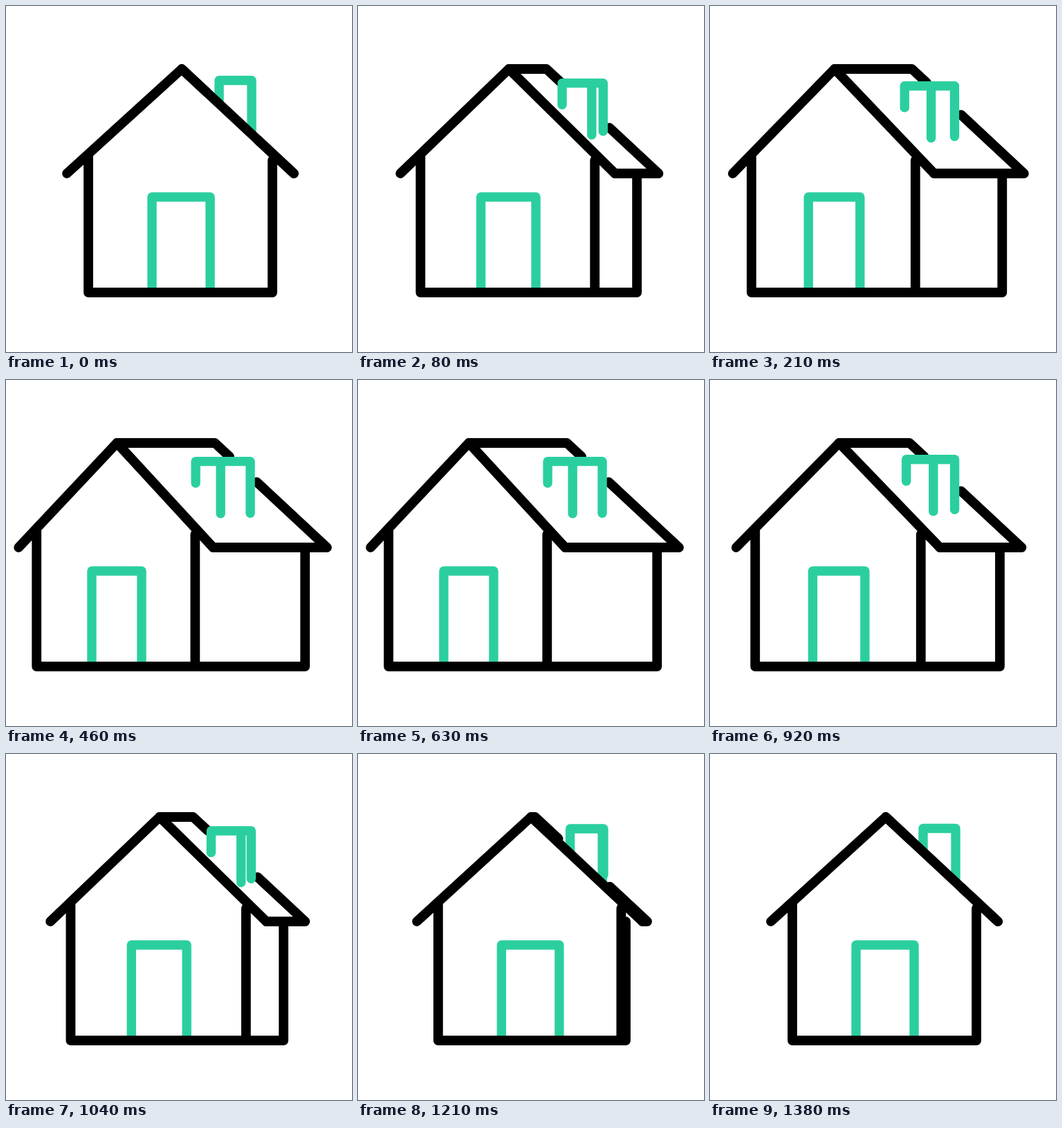
Write an HTML page that moves like this. It is 500 px wide and 500 px high and loops after 1430 ms.

```html
<!DOCTYPE html>
<html lang="en">
<head>
<meta charset="utf-8">
<title>House</title>
<style>
  html, body { margin: 0; width: 100%; height: 100%; overflow: hidden; background: #fff; }
  svg { display: block; width: 100vw; height: 100vh; }
  path { fill: none; stroke: #000; stroke-width: 13.8; stroke-linecap: round; stroke-linejoin: round; }
  .accent { stroke: #2bcf9f; stroke-width: 13.4; }
</style>
</head>
<body>
<svg viewBox="0 0 500 500">
  <path id="back"/>
  <path id="chimney" class="accent"/>
  <path id="door" class="accent"/>
  <path id="front"/>
</svg>
<script>
const LOOP = 1430, FPS = 24, LAST = 33;
const TOP = 91, EAVE = 242, BASE = 414;
const $ = id => document.getElementById(id);
const parts = { back: $('back'), chimney: $('chimney'), door: $('door'), front: $('front') };

function bezier(x1, y1, x2, y2) {
  const at = (p, q, s) => 3 * (1 - s) * (1 - s) * s * p + 3 * (1 - s) * s * s * q + s * s * s;
  return x => {
    if (x <= 0) return 0;
    if (x >= 1) return 1;
    let lo = 0, hi = 1;
    for (let i = 0; i < 30; i++) {
      const mid = (lo + hi) / 2;
      if (at(x1, x2, mid) < x) lo = mid; else hi = mid;
    }
    return at(y1, y2, lo);
  };
}

const turnOut = bezier(0.167, 0.167, 0.165, 1);
const turnBack = bezier(0.65, 0, 0.47, 1);

// 0 = seen from the front, 1 = fully turned
const turnAt = step => step < 14 ? turnOut(step / 12) : 1 - turnBack((step - 14) / 18);

const line = (...pts) => 'M' + pts.map(p => p.map(v => v.toFixed(2)).join(' ')).join('L');

function draw(a) {
  const mix = (from, to) => from + (to - from) * a;

  const apex = mix(254, 160), ridge = mix(254, 302);
  const eaveL = mix(88, 18), eaveM = mix(416, 299), eaveR = mix(416, 464);
  const wallL = mix(119, 44), wallM = mix(385, 273), wallR = mix(385, 432.3);
  const doorL = mix(211, 123.7), doorR = mix(295, 195.7);
  const chimL = mix(308, 274), chimM = mix(355, 310), chimR = mix(355, 353);
  const chimTop = mix(107.5, 117.7);

  // the rear slope is interrupted by the chimney
  const slope = k => [ridge + (eaveR - ridge) * k, TOP + (EAVE - TOP) * k];
  const cut = 0.13 + 0.09 * Math.max(0, 1 - a / 0.3);
  const resume = mix(0.68, 0.373);

  parts.back.setAttribute('d',
    line([apex, TOP], [ridge, TOP], slope(cut)) +
    line(slope(resume), [eaveR, EAVE], [eaveM, EAVE]));

  parts.chimney.setAttribute('d',
    line([chimL, mix(139, 149)], [chimL, chimTop], [chimR, chimTop], [chimR, mix(174, 192.5)]) +
    line([chimM, chimTop], [chimM, mix(182, 193)]));

  parts.door.setAttribute('d',
    line([doorL, BASE - 2], [doorL, 276], [doorR, 276], [doorR, BASE - 2]));

  parts.front.setAttribute('d',
    line([eaveL, EAVE], [apex, TOP], [eaveM, EAVE]) +
    line([wallL, 217], [wallL, BASE], [wallR, BASE], [wallR, EAVE]) +
    line([wallM, 223], [wallM, BASE]));
}

const start = performance.now();
function tick() {
  const t = (performance.now() - start) % LOOP;
  draw(turnAt(Math.min(LAST, Math.floor((t + 5.1) * FPS / 1000))));
  requestAnimationFrame(tick);
}
tick();
</script>
</body>
</html>
```
